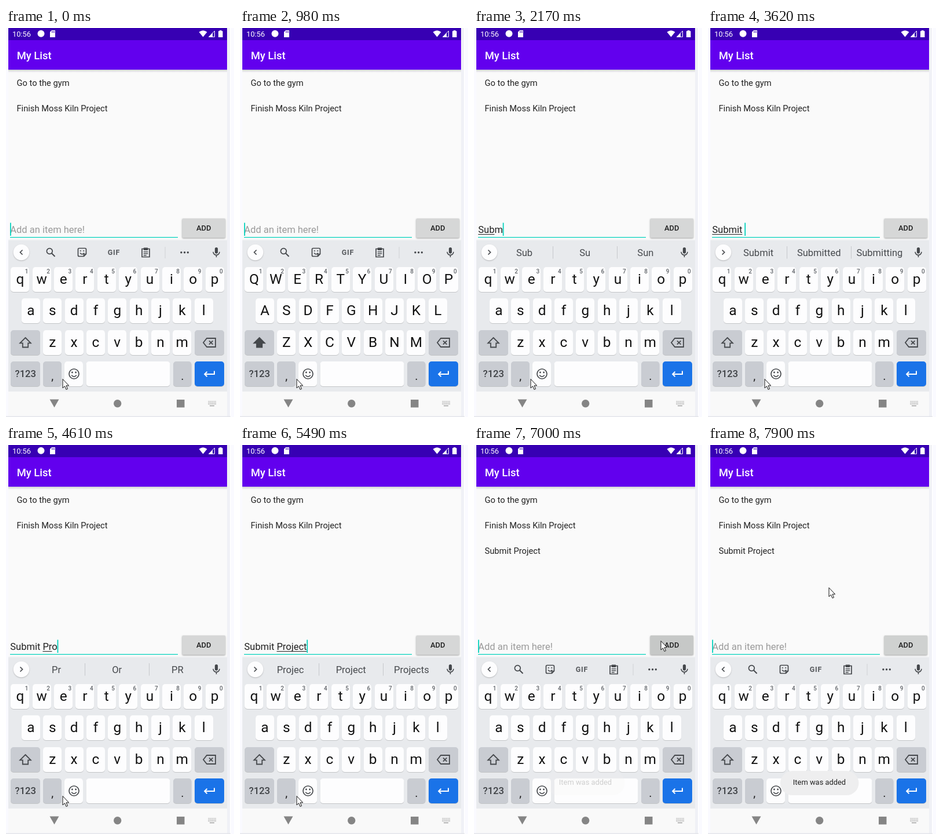
An HTML page with a canvas for the animation above (8 s loop, 394 by 672 pixels).

```html
<!DOCTYPE html>
<html lang="en">
<head>
<meta charset="utf-8">
<title>My List</title>
<style>
  html, body { margin: 0; width: 100%; height: 100%; overflow: hidden; background: #fafaff; }
  canvas { display: block; width: 394px; height: 672px; }
</style>
</head>
<body>
<canvas id="stage"></canvas>
<script>
const W = 394, H = 672, LOOP = 8000;
const canvas = document.getElementById('stage');
const ctx = canvas.getContext('2d');
const dpr = window.devicePixelRatio || 1;
canvas.width = W * dpr;
canvas.height = H * dpr;

const INK = '#45484c', TEAL = '#03d1bd', PANEL = '#e8eaed', GREY_KEY = '#c9ccd2';

// Typing: start time, text, underlined range, suggestions (null shows the toolbar).
const su = ['Su', 'Sun', 'Sub'];
const sub = ['Sub', 'Su', 'Sun'];
const submit = ['Submit', 'Submitted', 'Submitting'];
const next = ['the', 'a', 'my'];
const proj = ['Proje', 'Project', 'Projects'];
const typing = [
  [0, '', 0, 0, null],
  [1100, 'S', 0, 0, null],
  [1370, 'Su', 0, 1, null],
  [1650, 'Su', 0, 2, su],
  [2050, 'Sub', 0, 2, su],
  [2170, 'Subm', 0, 3, sub],
  [2450, 'Submi', 0, 4, ['Subm', 'Sub', 'Submit']],
  [2570, 'Submit', 0, 5, ['Submi', 'Submit', 'Submitted']],
  [2820, 'Submit', 0, 6, submit],
  [3620, 'Submit ', 0, 6, submit],
  [3870, 'Submit ', 0, 0, next],
  [4240, 'Submit P', 7, 7, ['P', 'I', 'PM']],
  [4490, 'Submit Pr', 7, 8, ['P', 'I', 'PM']],
  [4610, 'Submit Pro', 7, 9, ['Pr', 'Or', 'PR']],
  [4730, 'Submit Pro', 7, 10, ['Pro', 'Problem', 'Pros']],
  [4850, 'Submit Proj', 7, 10, ['Proj', 'Pro', 'Projects']],
  [5000, 'Submit Proje', 7, 11, proj],
  [5120, 'Submit Projec', 7, 12, proj],
  [5370, 'Submit Project', 7, 13, ['Projec', 'Project', 'Projects']],
  [5490, 'Submit Project', 7, 14, ['Projec', 'Project', 'Projects']],
  [5760, 'Submit Project', 7, 14, ['Project', 'Projects', 'Projector']],
  [6880, '', 0, 0, null]
];
const pointer = [
  [0, 98, 606], [5760, 132, 566], [5880, 215, 470], [6000, 305, 372],
  [6120, 365, 325], [6240, 360, 319], [6360, 337, 330], [6480, 323, 338],
  [7510, 329, 310], [7630, 332, 259], [7780, 268, 251], [7900, 209, 246]
];
const caretOff = [[120, 550], [3220, 3620], [6000, 6730], [7390, 7780]];

const at = (table, t) => table.filter(row => row[0] <= t).pop();
const clamp = v => Math.max(0, Math.min(1, v));

function rect(x, y, w, h, color, r = 0) {
  ctx.fillStyle = color;
  ctx.beginPath();
  ctx.roundRect(x, y, w, h, r);
  ctx.fill();
}

function dot(x, y, r, color) {
  ctx.fillStyle = color;
  ctx.beginPath();
  ctx.arc(x, y, r, 0, Math.PI * 2);
  ctx.fill();
}

function text(str, x, y, size, color, weight = 400, align = 'left') {
  ctx.font = `${weight} ${size}px Roboto, sans-serif`;
  ctx.textAlign = align;
  ctx.fillStyle = color;
  ctx.fillText(str, x, y);
}

function shape(path, color) {
  ctx.fillStyle = color;
  ctx.fill(new Path2D(path));
}

function line(path, color = INK, width = 1.7) {
  ctx.strokeStyle = color;
  ctx.lineWidth = width;
  ctx.stroke(new Path2D(path));
}

function place(x, y, draw) {
  ctx.save();
  ctx.translate(x, y);
  draw();
  ctx.restore();
}

function shadowed(color, blur, dy, draw) {
  ctx.save();
  ctx.shadowColor = color;
  ctx.shadowBlur = blur * dpr;
  ctx.shadowOffsetY = dy * dpr;
  draw();
  ctx.restore();
}

function drawStatusBar() {
  rect(4, 0, 378, 21, '#3700b3');
  text('10:56', 11, 14.7, 12.9, '#fff');
  dot(60.5, 9.7, 6, '#fff');
  shape('M79 4H85V16H76V7Z', '#fff');
  for (const x of [79, 81, 83]) rect(x, 5.5, 1, 2.5, '#3700b3');
  shape('M333.5 7Q340.5 1.5 347.5 7L340.5 15.5Z', '#fff');
  line('M350.5 15.3H360.5V5Z', '#fff', 1);
  shape('M350 15.8L357 8.5V15.8Z', '#fff');
  shape('M369 4H372.5V5.2H374.5V16H367V5.2H369Z', '#fff');
}

function drawApp(t, state) {
  rect(4, 72, 378, 295, '#fafafa');
  const fade = ctx.createLinearGradient(0, 72, 0, 77);
  fade.addColorStop(0, '#cfcfd3');
  fade.addColorStop(1, '#fafafa');
  rect(4, 72, 378, 5, fade);
  rect(4, 21, 378, 51, '#6200ee');
  text('My List', 18.7, 53.7, 18.4, '#fff', 500);

  const items = ['Go to the gym', 'Finish Moss Kiln Project'];
  if (t >= 6880) items.push('Submit Project');
  items.forEach((item, i) => text(item, 18.5, 100 + 44 * i, 14.7, '#222'));

  drawField(t, state);

  const pressed = t >= 6730 && t < 7240;
  const face = pressed ? '#c6c8c7' : t >= 6480 ? '#cfd1d0' : '#d6d7d7';
  shadowed('rgba(0,0,0,.35)', 2.5, 1, () => rect(304.5, 329, 74.5, 33.5, face, 1.8));
  text('ADD', 341.7, 350.3, 12.9, '#1f1f1f', 500, 'center');
}

function drawField(t, [, str, from, to]) {
  const x = 7.2, size = 16.55;
  rect(7, 361, 290, 1.2, TEAL);
  if (str) text(str, x, 354, size, '#202020');
  else text('Add an item here!', x, 354, size, '#9a9a9a');
  const width = n => ctx.measureText(str.slice(0, n)).width;
  if (to > from) rect(x + width(from), 356, width(to) - width(from), 1, '#202020');
  if (!caretOff.some(([a, b]) => t >= a && t < b)) rect(x + width(str.length) - .2, 336.5, 1.8, 22.5, TEAL);
}

function drawToolbar() {
  line('M28.5 383.5L24.5 387.5L28.5 391.5');
  line('M79 389.3L84.5 394.8', INK, 2);
  line('M80.2 385.5A4.9 4.9 0 1 1 70.4 385.5A4.9 4.9 0 1 1 80.2 385.5');
  place(131.5, 387.5, () => {
    line('M-5 -7H5Q7 -7 7 -5V3L3 7H-5Q-7 7 -7 5V-5Q-7 -7 -5 -7ZM3 7V3H7');
    line('M-3.5 1Q0 5.5 3.5 1', INK, 1.4);
    dot(-2.7, -2.5, 1.1, INK);
    dot(2.7, -2.5, 1.1, INK);
  });
  ctx.letterSpacing = '0.8px';
  text('GIF', 186.4, 392, 12.5, '#55585c', 700, 'center');
  ctx.letterSpacing = '0px';
  place(241.5, 388, () => {
    line('M-6.5 -6.5H6.5V7.5H-6.5Z');
    rect(-3.8, -8.5, 7.6, 4.5, INK, 1);
    for (const y of [-2, 1, 4]) rect(-3.8, y, y === 4 ? 5 : 7.6, 1.4, INK);
  });
  rect(274.5, 378, 1, 20, '#cfd1d5');
  for (const dx of [-5.7, 0, 5.7]) dot(308.6 + dx, 387.7, 1.7, INK);
}

function drawSuggestions(words) {
  line('M24.5 383.5L28.5 387.5L24.5 391.5');
  words.forEach((word, i) => text(word, 87 + 104.7 * i, 394, 16.55, '#46494d', 400, 'center'));
  rect(136, 377, 1, 21.5, '#c6c8cc');
  rect(247, 377, 1, 21.5, '#c6c8cc');
}

function drawMic() {
  place(363.5, 387.5, () => {
    rect(-2.6, -8.5, 5.2, 10.7, INK, 2.6);
    line('M-5.5 -.8A5.5 5.5 0 0 0 5.5 -.8M0 5V8.5', INK, 1.6);
  });
}

function key(x, y, w, color = '#fdfdfe', h = 43) {
  rect(x, y + 1, w, h, 'rgba(0,0,0,.16)', 5);
  rect(x, y, w, h, color, 5);
}

function drawKeys(upper) {
  const rows = [['qwertyuiop', 24.4, 413, 442.3], ['asdfghjkl', 42.9, 467, 496.4], ['zxcvbnm', 80.2, 522, 550.8]];
  for (const [letters, x0, y, base] of rows) {
    [...letters].forEach((letter, i) => {
      const x = x0 + 37.35 * i;
      key(Math.round(x - 16), y, 32);
      text(upper ? letter.toUpperCase() : letter, x, base, 24.4, '#111', 400, 'center');
      if (y === 413) text((i + 1) % 10, x + 11.3, 424.2, 10, '#5f6368', 500, 'center');
    });
  }

  key(8, 522, 51, GREY_KEY);
  place(33.5, 543.5, () => {
    const arrow = 'M0 -8.5L9.3 .8H4.7V8H-4.7V.8H-9.3Z';
    if (upper) shape(arrow, INK);
    line(arrow, INK, 1.8);
  });
  key(326, 522, 51, GREY_KEY);
  place(351.5, 543.5, () => {
    line('M-4.5 -7.5H10.5V7.5H-4.5L-10.5 0Z', INK, 1.8);
    line('M-.5 -3.2L5.9 3.2M5.9 -3.2L-.5 3.2', INK, 1.8);
  });

  key(8, 576, 51, GREY_KEY);
  text('?123', 33.8, 603, 16.6, '#3f4246', 500, 'center');
  key(64, 576, 32, GREY_KEY);
  text(',', 80.3, 608, 20, '#222', 400, 'center');
  key(101, 576, 32);
  place(117.5, 597.5, () => {
    line('M8.5 0A8.5 8.5 0 1 1 -8.5 0A8.5 8.5 0 1 1 8.5 0M-4.3 2.3Q0 7.6 4.3 2.3');
    dot(-3.1, -2.5, 1.4, INK);
    dot(3.1, -2.5, 1.4, INK);
  });
  key(138.5, 576, 145);
  key(289, 576, 31.5, GREY_KEY);
  text('.', 304.8, 608, 20, '#222', 400, 'center');
  key(326, 576, 51, '#1a73e8');
  line('M360 592.5V598H343.5M347.5 593.7L343.2 598L347.5 602.3', '#fff', 2);
}

function drawNavBar() {
  const grey = '#858585';
  rect(4, 628, 378, 42, '#f9f9f9');
  shape('M75.5 641.5H91.5L83.5 655.5Z', grey);
  dot(192.7, 648.7, 6.7, grey);
  rect(295, 642, 13.5, 13.5, grey);
  for (let r = 0; r < 3; r++)
    for (let c = 0; c < 6; c++) rect(349.5 + c * 2.4, 644.5 + r * 2.4, 1.3, 1.3, '#999');
  rect(352, 652, 8, 1.3, '#999');
}

function drawToast(t) {
  ctx.globalAlpha = clamp((t - 6900) / 500);
  rect(125, 563, 135.5, 42, '#eeeeef', 21);
  text('Item was added', 192.5, 587, 12.9, '#222', 400, 'center');
  ctx.globalAlpha = 1;
}

function drawPointer(t) {
  const [, x, y] = at(pointer, t);
  place(x - .5, y, () => {
    const arrow = 'M.5 .5V16L4 12.7L6.5 18.5L9 17.4L6.5 11.8H11.2Z';
    shape(arrow, '#fff');
    line(arrow, '#111', 1);
  });
}

function draw(t) {
  const state = at(typing, t);
  ctx.setTransform(dpr, 0, 0, dpr, 0, 0);
  rect(0, 0, W, H, '#fafaff');
  rect(382, 0, 6, H, '#f0f1f6');
  rect(387, 0, 1.5, H, '#fff');
  drawStatusBar();
  drawApp(t, state);
  rect(4, 365.5, 378, 1.5, '#f0f1f3');
  rect(4, 367, 378, 261, PANEL);
  shadowed('rgba(0,0,0,.22)', 2, 1, () => dot(26.5, 387.5, 13.8, '#fdfdfe'));
  if (state[4]) drawSuggestions(state[4]);
  else drawToolbar();
  drawMic();
  drawKeys(t >= 980 && t < 1250);
  drawNavBar();
  rect(0, 670.5, 388, 1.5, '#e4e5ea');
  drawToast(t);
  drawPointer(t);
}

const start = performance.now();
function tick() {
  draw((performance.now() - start) % LOOP);
  requestAnimationFrame(tick);
}
tick();
</script>
</body>
</html>
```
